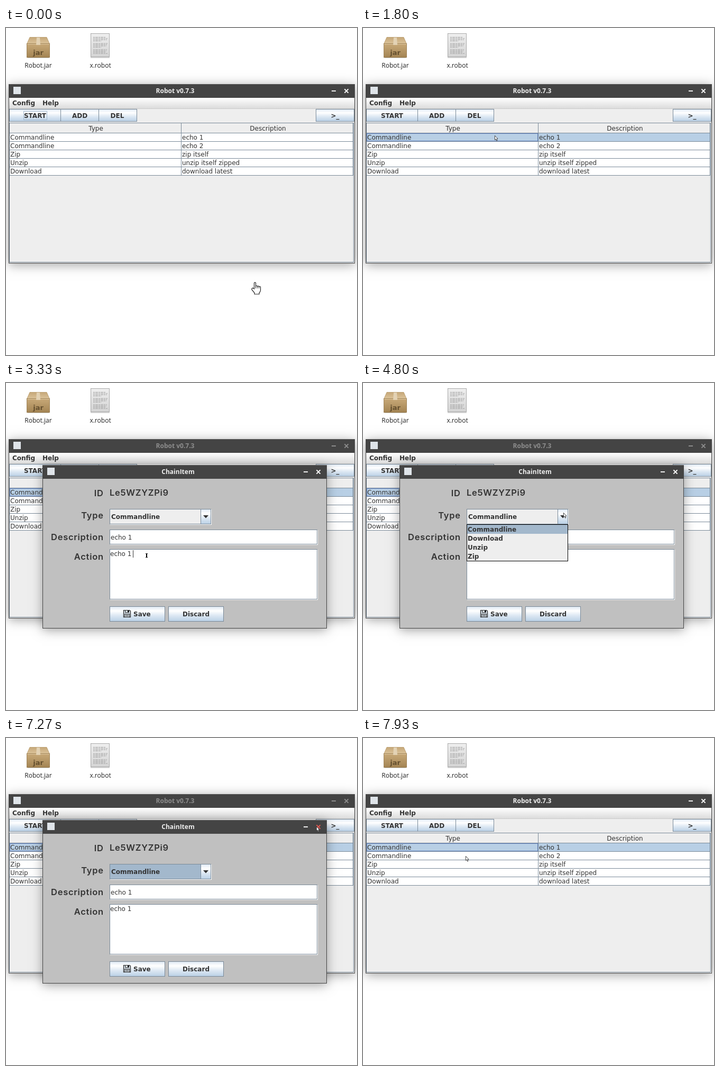
An HTML page with a canvas that plays this animation: 664 px wide and 618 px high, repeating every 8000 ms.

```html
<!DOCTYPE html>
<html lang="en">
<head>
<meta charset="utf-8">
<title>Robot</title>
<style>
html, body { margin: 0; width: 100%; height: 100%; overflow: hidden; background: #fff; }
canvas { display: block; }
</style>
</head>
<body>
<canvas id="stage" width="664" height="618"></canvas>
<script>
const ctx = document.getElementById('stage').getContext('2d');
const LOOP = 8000, TICK = 1000 / 15;
const UI = '12px "DejaVu Sans", sans-serif', UI_BOLD = 'bold ' + UI;
const DESK = '12px "Open Sans", sans-serif', TITLE = 'bold ' + DESK;
const LABEL = '600 16.5px Inter, sans-serif';
const INK = '#333', EDGE = '#7a8a99', PANEL = '#eee', FRAME = '#444', SELECT = '#b8cfe5', FOCUS = '#a3b8cc';
const TYPES = ['Commandline', 'Download', 'Unzip', 'Zip'];
const ROWS = [
  ['Commandline', 'echo 1'], ['Commandline', 'echo 2'], ['Zip', 'zip itself'],
  ['Unzip', 'unzip itself zipped'], ['Download', 'download latest']
];

// pointer path: time, x, y
const PATH = [
  [0, 471, 480], [133, 452, 462], [333, 360, 380], [533, 240, 288], [667, 194, 238], [733, 193, 224],
  [867, 238, 210], [933, 238, 210], [1200, 249, 203], [2667, 249, 203], [2800, 251, 218],
  [3067, 262, 296], [3267, 266, 326], [3600, 266, 326], [3733, 283, 312], [3933, 340, 268],
  [4133, 368, 246], [4267, 368, 246], [4400, 379, 245], [6400, 379, 245], [6600, 418, 232],
  [6867, 530, 189], [7000, 572, 172], [7133, 587, 167], [7267, 587, 167], [7400, 520, 175],
  [7533, 320, 194], [7667, 196, 206], [7800, 196, 206], [7867, 195, 214], [7933, 194, 223]
];

function rect(x, y, w, h, color) {
  ctx.fillStyle = color;
  ctx.fillRect(x, y, w, h);
}

function outline(x, y, w, h, color, width = 1) {
  ctx.strokeStyle = color;
  ctx.lineWidth = width;
  ctx.strokeRect(x + .5, y + .5, w - 1, h - 1);
}

function poly(points, fill, stroke, width = 1) {
  ctx.beginPath();
  points.forEach(([x, y]) => ctx.lineTo(x, y));
  ctx.closePath();
  if (fill) { ctx.fillStyle = fill; ctx.fill(); }
  if (stroke) { ctx.strokeStyle = stroke; ctx.lineWidth = width; ctx.stroke(); }
}

function text(str, x, y, font = UI, color = INK, align = 'left') {
  ctx.font = font;
  ctx.fillStyle = color;
  ctx.textAlign = align;
  ctx.fillText(str, x, y);
}

function ramp(y, h, ...stops) {
  const g = ctx.createLinearGradient(0, y, 0, y + h);
  stops.forEach(([at, color]) => g.addColorStop(at, color));
  return g;
}

function button(x, y, w, h) {
  rect(x, y, w, h, ramp(y, h, [0, '#dde8f3'], [.3, '#fff'], [.6, '#dde8f3'], [1, '#b8cfe5']));
  outline(x, y, w, h, EDGE);
}

function field(x, y, w, h, fill = '#fff') {
  rect(x + 1, y + 1, w, h, '#fff');
  rect(x, y, w, h, fill);
  outline(x, y, w, h, EDGE);
}

function windowFrame(x, y, w, h, title, body, active, hover) {
  ctx.save();
  ctx.shadowColor = 'rgba(0,0,0,.36)';
  ctx.shadowBlur = 20;
  ctx.shadowOffsetY = 3;
  rect(x, y, w, h, FRAME);
  ctx.restore();
  rect(x + 1, y + 26, w - 2, h - 27, body);
  rect(x, y, w, 1, '#555');
  const color = active ? '#eee' : '#8c8c8c';
  text(title, x + w / 2 - 12.5, y + 17, TITLE, color, 'center');
  rect(x + w - 44, y + 12, 8, 2, color);
  const cx = x + w - 16, cy = y + 13;
  ctx.strokeStyle = hover ? '#e05650' : active ? '#fff' : color;
  ctx.lineWidth = 2;
  ctx.beginPath();
  for (const s of [-1, 1]) {
    ctx.moveTo(cx - 3.6, cy - 3.6 * s);
    ctx.lineTo(cx + 3.6, cy + 3.6 * s);
  }
  ctx.stroke();
  rect(x + 9, y + 5, 14, 14, '#dfe4e9');
}

function desktop() {
  rect(0, 0, 664, 618, '#fff');
  rect(41, 55, 40, 2, 'rgba(0,0,0,.18)');
  poly([[45, 17.5], [77, 17.5], [82.5, 30], [39.5, 30]], ramp(17, 13, [0, '#c5a677'], [1, '#dcc49b']), '#b1925f', .7);
  rect(39.5, 30, 43, 26, ramp(30, 26, [0, '#c7a877'], [1, '#a38453']));
  outline(39, 29, 44, 27, '#927344', .8);
  rect(40, 30, 42, 1, '#e1cba5');
  poly([[58, 18], [64, 18], [65, 32], [57, 32]], '#e3d2b4');
  text('jar', 61, 51, 'bold 13px "DejaVu Sans", sans-serif', '#65502f', 'center');
  text('Robot.jar', 61, 75, DESK, '#222', 'center');

  rect(160, 55, 36, 2, 'rgba(0,0,0,.15)');
  rect(160, 10, 36, 45, ramp(10, 45, [0, '#efefef'], [1, '#d4d4d4']));
  outline(160, 10, 36, 45, '#999', .8);
  for (let i = 0; i < 14; i++) {
    if (i === 4 || i === 9) continue;
    const w = i === 3 || i === 8 ? 15 : 24 + (i * 7) % 4;
    ctx.globalAlpha = .75;
    ctx.setLineDash([3, 1, 5, 1]);
    ctx.strokeStyle = '#8a8a8a';
    ctx.lineWidth = 1;
    ctx.beginPath();
    ctx.moveTo(165, 17.5 + i * 2.35);
    ctx.lineTo(165 + w, 17.5 + i * 2.35);
    ctx.stroke();
  }
  ctx.setLineDash([]);
  ctx.globalAlpha = 1;
  text('x.robot', 178.5, 75, DESK, '#222', 'center');
}

function mainWindow(active, selected) {
  windowFrame(5, 106, 655, 339, 'Robot v0.7.3', PANEL, active);
  rect(6, 132, 653, 21, ramp(132, 21, [0, '#fff'], [1, '#dadada']));
  rect(6, 152, 653, 1, '#ccc');
  text('Config', 12, 146, UI_BOLD);
  text('Help', 69, 146, UI_BOLD);

  for (const [label, x, w] of [['START', 6, 98], ['ADD', 103, 73], ['DEL', 175, 73], ['>_', 586, 73]]) {
    button(x, 153, w, 24);
    text(label, x + w / 2 + (x === 175 ? -1 : 0), 170, UI_BOLD, INK, 'center');
  }
  if (!selected) outline(33, 157, 45, 17, FOCUS);

  outline(6, 179, 652, 264, EDGE);
  rect(658, 180, 1, 264, '#fff');
  rect(7, 198, 650, 1, EDGE);
  text('Type', 170, 194, UI, INK, 'center');
  text('Description', 495.5, 194, UI, INK, 'center');
  ROWS.forEach(([type, note], i) => {
    const y = 199 + i * 16;
    rect(7, y, 649, 15, selected && !i ? SELECT : '#fff');
    rect(7, y + 15, 650, 1, EDGE);
    text(type, 8, y + 12);
    text(note, 333, y + 12);
  });
  rect(331, 180, 1, 99, EDGE);
  rect(656, 180, 1, 99, EDGE);
  if (selected) outline(7, 199, 324, 15, '#6382bf');
}

function floppy(x, y) {
  poly([[x + .5, y + .5], [x + 12, y + .5], [x + 13.5, y + 2], [x + 13.5, y + 13.5], [x + .5, y + 13.5]], '#dce6ef', '#222', 1.2);
  outline(x + 3, y, 8, 5, '#222');
  rect(x + 8, y + 1, 2, 3, '#222');
  outline(x + 2, y + 7, 10, 7, '#222');
  rect(x + 4, y + 9, 6, 1, '#444');
  rect(x + 4, y + 11, 6, 1, '#444');
}

function dialog(now, hover) {
  windowFrame(69, 155, 538, 309, 'ChainItem', '#c0c0c0', true, hover);
  ctx.letterSpacing = '0.7px';
  [['ID', 214], ['Type', 256], ['Description', 297], ['Action', 334]]
    .forEach(([label, y]) => text(label, 184.7, y, LABEL, INK, 'right'));
  text('Le5WZYZPi9', 196, 213, LABEL);
  ctx.letterSpacing = '0px';

  field(196, 238, 192, 29, now >= 6200 ? FOCUS : PANEL);
  button(368, 238, 20, 29);
  poly([[373, 250], [383, 250], [378, 255.5]], INK);
  text('Commandline', 199, 257, UI_BOLD);

  field(196, 277, 393, 28);
  text('echo 1', 198, 296);
  field(196, 314, 393, 95);
  text('echo 1', 197, 327);
  if (now < 2730) rect(241, 285, 1, 14, INK);
  if (now >= 3330 && now < 3860 || now >= 4330 && now < 4800) rect(240, 316, 1, 14, INK);

  button(196, 422, 105, 29);
  floppy(222, 429);
  text('Save', 241, 441, UI_BOLD);
  button(307, 422, 105, 29);
  text('Discard', 359.5, 441, UI_BOLD, INK, 'center');

  if (now >= 4800 && now < 6070) {
    rect(196, 267, 192, 70, PANEL);
    rect(197, 268, 190, 17, FOCUS);
    outline(196, 267, 192, 70, '#000');
    TYPES.forEach((type, i) => text(type, 198, 281 + i * 17, UI_BOLD));
  }
}

function pointerAt(time) {
  const i = PATH.findIndex(p => p[0] > time);
  if (i < 0) return PATH[PATH.length - 1].slice(1);
  const [t0, x0, y0] = PATH[i - 1], [t1, x1, y1] = PATH[i];
  const u = (time - t0) / (t1 - t0);
  return [Math.round(x0 + (x1 - x0) * u), Math.round(y0 + (y1 - y0) * u)];
}

function hand() {
  ctx.beginPath();
  ctx.moveTo(-1.5, 13);
  ctx.lineTo(-1.5, 2);
  ctx.quadraticCurveTo(0, -.8, 1.5, 2);
  ctx.lineTo(1.5, 8);
  for (const x of [1.5, 4.5, 7.5]) {
    ctx.quadraticCurveTo(x + 1.7, 5.5 + x / 4, x + 3, 8 + x / 5);
  }
  ctx.lineTo(10.5, 16);
  ctx.quadraticCurveTo(10, 19, 8, 20.5);
  ctx.lineTo(8, 23);
  ctx.lineTo(-1, 23);
  ctx.lineTo(-1, 20.5);
  ctx.lineTo(-6, 14.5);
  ctx.quadraticCurveTo(-6.3, 11, -3.5, 11.5);
  ctx.closePath();
  ctx.fillStyle = '#fff';
  ctx.fill();
  ctx.strokeStyle = '#222';
  ctx.lineWidth = 1.2;
  ctx.stroke();
  for (const x of [1.5, 4.5, 7.5]) rect(x - .5, 8, 1, 4, '#222');
}

function pointer(x, y, overText) {
  ctx.save();
  ctx.translate(x, y);
  if (y > 445) {
    hand();
  } else if (overText) {
    rect(-2, -4, 4, 1, '#000');
    rect(-2, 3, 4, 1, '#000');
    rect(-1, -3, 2, 6, '#000');
  } else {
    poly([[.4, .4], [.4, 8.5], [2.2, 7], [3.6, 10.2], [5, 9.6], [3.7, 6.5], [6, 6.2]], '#fff', '#333', .9);
  }
  ctx.restore();
}

function draw(time) {
  const step = Math.floor((time + 4) / TICK) * TICK;
  const now = step + 4;
  const [x, y] = pointerAt(step);
  const open = now >= 2130 && now < 7330;
  const hover = x > 582 && y < 178;
  const overText = open && x > 196 && x < 589 && (y > 277 && y < 305 || y > 314 && y < 409);
  desktop();
  mainWindow(!open, now >= 1800);
  if (open) dialog(now, hover);
  pointer(x, y, overText);
}

const start = performance.now();
function frame() {
  draw((performance.now() - start) % LOOP);
  requestAnimationFrame(frame);
}
frame();
</script>
</body>
</html>
```
